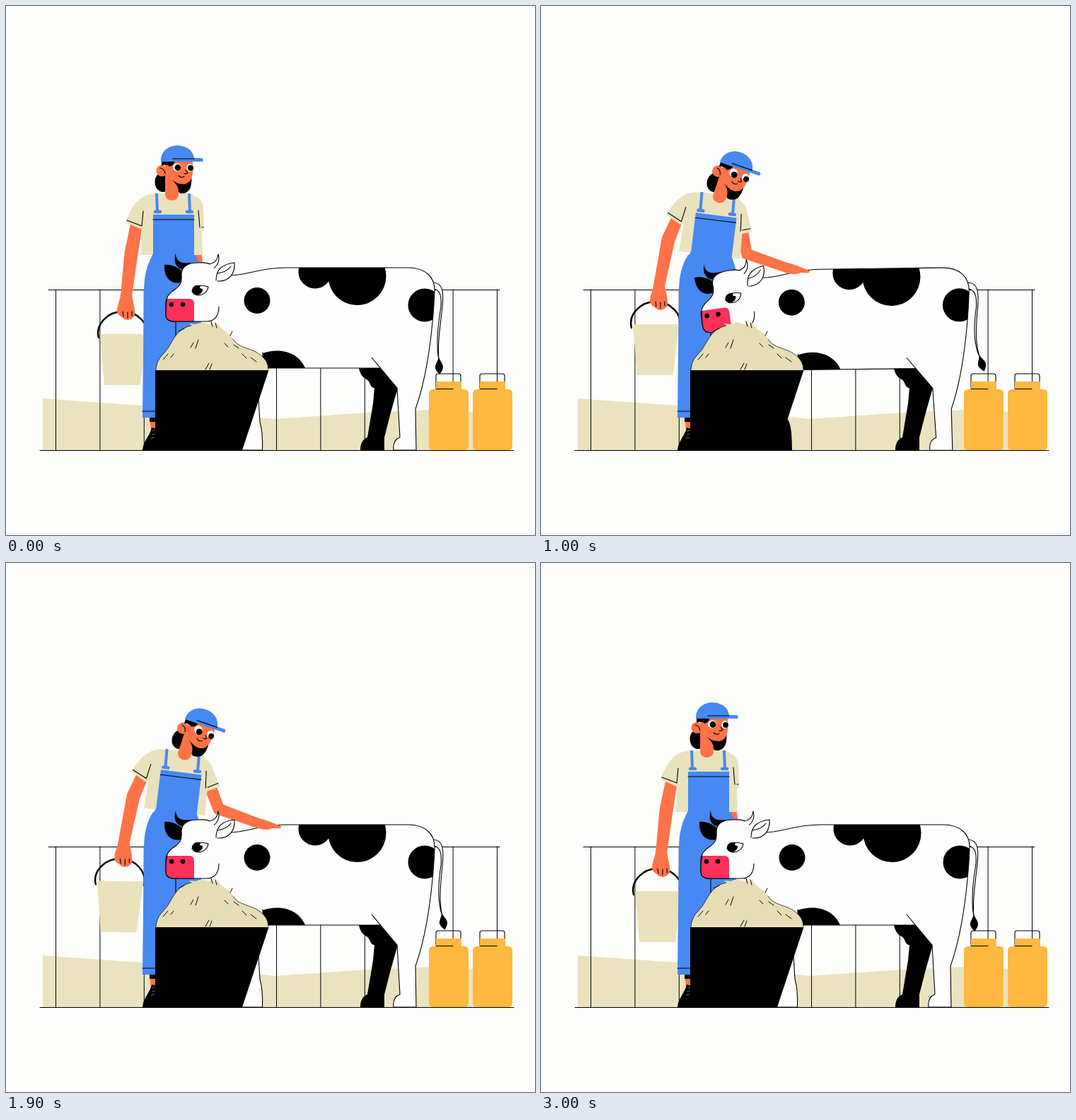
These frames come from a looping animation (748 px wide and 748 px high, 3030 ms). An HTML page:

```html
<!DOCTYPE html>
<html lang="en">
<head>
<meta charset="utf-8">
<title>Farmer and cow</title>
<style>
  html, body { margin: 0; width: 100%; height: 100%; overflow: hidden; background: #fdfdfb; }
  svg { display: block; width: 100%; height: 100%; }
  .ln { fill: none; stroke: #000; stroke-width: 1.1; stroke-linecap: round; stroke-linejoin: round; }
  .wh { fill: #fefefe; stroke: #000; stroke-width: 1.1; stroke-linejoin: round; stroke-linecap: round; }
  .skin { fill: #ff7348; }
  .blue { fill: #4788f2; }
  .shirt { fill: #e9e2bd; }
  .can { fill: #ffb840; }
</style>
</head>
<body>
<svg viewBox="0 0 748 748">
  <defs>
    <path id="bodyShape" d="M312 381C340 382 355 370 397 370H568C594 370 607 384 606 404C604 450 597 520 579 570L580 628H548C547 618 551 612 557 610L553 540L529 512H290V400Z"/>
    <clipPath id="bodyClip"><use href="#bodyShape"/></clipPath>
    <g id="can">
      <rect class="ln" x="608" y="520" width="35" height="22" rx="3"/>
      <path class="can" d="M608 531H644V542H648Q654 542 654 548V622Q654 628 648 628H604Q598 628 598 622V548Q598 542 604 542H608Z"/>
      <path class="ln" d="M608 541.5H632"/>
    </g>
    <path id="palm" class="skin" d="M-5-7C6-8 13-5 19-4L29-2C31 0 29 2 26 2L18 3C14 7 3 8-5 6Z"/>
  </defs>

  <path fill="#ebe3c0" d="M52 555L193 565L380 584L510 575L600 571L690 575V628H52Z"/>
  <path id="fence" class="ln" style="stroke-width:1"/>

  <g id="pail">
    <path class="shirt" d="M-32 31H33L25 103H-26Z"/>
    <path class="ln" style="stroke-width:2.4" d="M-34 36C-39 16-20-1 0-1S39 16 34 36"/>
  </g>

  <path id="farArm" class="skin"/>
  <use id="farHand" href="#palm"/>
  <g id="farSleeve">
    <path class="shirt" d="M-14-14C0-21 11-13 12 0L13 33H-12Z"/>
    <path class="ln" d="M-11 28H12"/>
  </g>

  <path id="nearArm" class="skin"/>
  <g id="nearHand">
    <path class="skin" d="M-8-2C-9 8-13 12-13 22C-11 29-6 29-4 32C0 35 5 34 8 32L12 28C13 18 9 8 8-2Z"/>
    <path class="ln" d="M-5 22L-4 29M2 23V31M8 22V28"/>
  </g>

  <g id="torso">
    <path class="shirt" d="M212 265H260C272 268 276 285 276 300L278 352H191L194 280Z"/>
    <g id="nearSleeve">
      <path class="shirt" d="M212 265C186 266 176 287 169 306L192 316L214 300Z"/>
      <path class="ln" d="M194 290L192 311L171 303"/>
    </g>
    <path class="ln" d="M272 289L274 313"/>
    <path class="blue" d="M208 295H266V352L272 368H200L208 350Z"/>
    <path class="ln" d="M208 302H266"/>
    <path d="M213 265L214 291M259 265L260 291" stroke="#4788f2" stroke-width="4"/>
    <path d="M211 291H218M256 291H263" stroke="#4788f2" stroke-width="4.5" stroke-linecap="round"/>
  </g>

  <path class="blue" d="M208 352C199 366 195 382 195 405L193 582H240V440H276C281 410 280 374 268 352Z"/>
  <path class="blue" d="M238 440H276V520H238Z"/>
  <path class="ln" d="M193 573H213M240 440V470"/>
  <path class="skin" d="M203 582H213V600H205Z"/>
  <path d="M203 582H213V588H203ZM193 628C194 615 204 607 206 596L213 598V628Z"/>
  <path d="M207 601L211 600M206 606L211 605M205 611L210 610" stroke="#5d6b60" stroke-width="1"/>

  <g id="face">
    <ellipse cx="222" cy="249" rx="11.500" ry="14"/>
    <path class="skin" d="M225 235H244V266C244 278 225 278 225 266Z"/>
    <path d="M234 246L262 240C264 258 258 266 246 265L244 263C244 256 240 250 234 246Z"/>
    <path class="skin" d="M225 218H264V236C263 247 257 252 251 252C243 252 238 248 234 246L225 246Z"/>
    <circle class="skin" cx="220.500" cy="233" r="8"/>
    <path class="ln" d="M218 229Q224 230 225 237"/>
    <path d="M220 219H239C237 225 233 227 231 227C228 224 224 224 220 226Z"/>
    <circle cx="242" cy="228" r="5.800" fill="#fff"/>
    <ellipse cx="260" cy="228.500" rx="4.600" ry="5.400" fill="#fff"/>
    <g id="pupils"><circle cx="243" cy="228.500" r="4.400"/><circle cx="261" cy="229" r="4"/></g>
    <path class="ln" d="M254 232L257 236Q255 238 252 237M244 240Q248 244 252 241"/>
    <path class="blue" d="M219 220C218 191 262 190 266 215H277Q280 217 278 220Z"/>
    <path class="ln" d="M236 216H266"/>
  </g>

  <g><path id="tailLine" class="wh"/><path id="tuft" d="M0-3C-2 3-6 8-5 12C-4 16-1 18 1 21C3 18 6 15 6 10C5 5 2 2 0-3Z"/></g>
  <path d="M499 512H530L554 540L544 575L535 610V628H501C501 618 505 612 511 610L519 562L521 540C514 540 516 530 508 527C503 524 500 518 499 512Z"/>
  <path d="M335 550L348 583C353 590 355 602 355 628H325Z"/>
  <path id="foreleg" class="wh" d="M325 540H350L357 556L359 588C363 602 363 615 362.500 628H325Z"/>

  <g id="cow">
    <use href="#bodyShape" fill="#fefefe"/>
    <g clip-path="url(#bodyClip)">
      <circle cx="355" cy="416.500" r="18.500"/>
      <circle cx="437" cy="376" r="23.500"/>
      <circle cx="496.500" cy="382" r="41"/>
      <circle cx="592" cy="423" r="23.500"/>
      <path d="M363 491C385 483 413 488 423 512H363Z"/>
    </g>
    <path class="ln" d="M312 381C340 382 355 370 397 370H568C594 370 607 384 606 404C604 450 597 520 579 570L580 628H548C547 618 551 612 557 610L553 540L517 497M363 490V512H529"/>
  </g>
  <use id="frontHand" href="#palm"/>

  <g id="cowHead">
    <path d="M240 350C240 361 248 365 262 363L251 373C240 371 236 361 240 350Z"/>
    <path d="M224 366C233 365 243 369 250 376L247 391C233 394 223 384 224 366Z"/>
    <path class="wh" d="M300 351C303 361 298 369 289 374L284 365C294 365 299 360 300 351Z"/>
    <path fill="#fefefe" d="M280 364L316 382L312 440H290Z"/>
    <path class="wh" d="M288 365C283 362 278 363 272 363C258 363 248 368 248 380C249 392 246 395 240 400C230 406 226 412 226 420V436C226 443 231 446 238 446H284C295 446 301 438 301 425"/>
    <path fill="#fefefe" d="M286 366L300 374L306 425L299 425L280 380Z"/>
    <path class="wh" d="M297 388C297 372 306 365 323 363C324 377 317 390 299 389"/>
    <path class="ln" d="M299 378C307 377 314 374 318 368"/>
    <path fill="#ff3059" d="M228 414H259Q266 414 266 421V445.500H238C230 445 226.500 442 226.500 436V420Z"/>
    <path class="ln" d="M228 414C226 418 226 430 226 436C226 443 231 446 238 446H266"/>
    <circle cx="234" cy="422" r="3.300"/><circle cx="250" cy="422" r="3.300"/>
    <path class="wh" d="M263 404C264 396 273 393 286 397C285 405 277 411 267 408"/>
    <path d="M263 403C263 396 270 393 275 396L274 399L278 400C279 409 264 412 263 403Z"/>
  </g>

  <path fill="#e7ddb5" d="M212 516C213 498 222 494 229 484C238 469 243 456 262 452L259 449L268 450L277 447L288 450L291 446L294 451L299 448C305 460 316 460 321 471C328 484 346 483 358 492C369 500 371 508 371 516Z"/>
  <path class="ln" style="stroke-width:.7" d="M212 514C213 498 222 494 229 484C238 469 243 456 262 452M321 471C328 484 346 483 358 492C369 500 371 508 371 514"/>
  <path class="ln" style="stroke-width:1" d="M244 460L252 456M290 446L292 453M296 448L298 455M272 472L268 484M265 476L261 483M229 492L222 500M237 492L233 497M287 505L282 514M291 506L288 514M309 477L314 482M322 479L329 484M334 492L340 498M346 497L354 503M320 460L317 466"/>
  <path d="M211 515H371.500L334 628H211Z"/>
  <use href="#can"/><use href="#can" x="62"/>
  <path class="ln" d="M48 628.500H718"/>
</svg>

<script>
const LOOP = 3030;
const HIP = [235, 383], LEAN = 7, NOD = 12;
const ARM = 62.3;

// Each row: time in ms, then value(s)
const tracks = {
  lean: [[0, 0], [430, 0], [1000, 1], [2060, 1], [2620, 0], [LOOP, 0]],
  swing: [[0, 0], [430, 0], [770, 6], [1080, -1], [1270, 1], [2060, 1], [2350, -4], [2640, 1.5], [2850, 0], [LOOP, 0]],
  head: [[0, 0], [330, -7], [530, -8.5], [770, -6.5], [1000, -8], [1270, -9], [1630, -1.8], [1850, 0], [LOOP, 0]],
  step: [[0, 0], [300, -32], [540, -32], [770, -14], [1000, -32], [1290, -32], [1630, -5], [1850, 0], [LOOP, 0]],
  tail: [[0, 0], [330, 2], [770, 9], [1270, 14.5], [1630, 11], [2170, 1.5], [2600, 0], [LOOP, 0]],
  reach: [[0, 276, 409], [430, 276, 409], [770, 298, 398], [1000, 350, 371], [1270, 373, 367],
    [1630, 341, 367], [2080, 369, 370], [2170, 367, 370], [2400, 308, 396], [2640, 276, 409], [LOOP, 276, 409]]
};

const $ = id => document.getElementById(id);
const set = (id, name, value) => $(id).setAttribute(name, value);
const move = (id, value) => set(id, 'transform', value);
const mix = (a, b, k) => a.map((v, i) => v + (b[i] - v) * k);
const sine = k => (1 - Math.cos(Math.PI * k)) / 2;
const cubic = k => k < .5 ? 4 * k ** 3 : 1 - (2 - 2 * k) ** 3 / 2;

function at(track, t, ease = sine) {
  const i = track.findIndex(row => row[0] > t);
  const a = track[i - 1], b = track[i];
  const row = mix(a, b, ease((t - a[0]) / (b[0] - a[0]))).slice(1);
  return row.length > 1 ? row : row[0];
}

function turn([x, y], deg, [cx, cy]) {
  const r = deg * Math.PI / 180, c = Math.cos(r), s = Math.sin(r);
  return [cx + (x - cx) * c - (y - cy) * s, cy + (x - cx) * s + (y - cy) * c];
}

// Tapered three-joint limb outline
function limb(pts, half) {
  const left = [], right = [];
  pts.forEach(([x, y], i) => {
    const a = pts[Math.max(0, i - 1)], b = pts[Math.min(2, i + 1)];
    const dx = b[0] - a[0], dy = b[1] - a[1], n = half[i] / Math.hypot(dx, dy);
    left.push([x - dy * n, y + dx * n]);
    right.unshift([x + dy * n, y - dx * n]);
  });
  return 'M' + left.concat(right).join('L') + 'Z';
}

function elbow(s, w) {
  const dx = w[0] - s[0], dy = w[1] - s[1], d = Math.hypot(dx, dy);
  const k = Math.sqrt(Math.max(0, ARM * ARM - d * d / 4)) / d;
  return [(s[0] + w[0]) / 2 - dy * k, (s[1] + w[1]) / 2 + dx * k];
}

function farmer(t) {
  const lean = at(tracks.lean, t, cubic), swing = at(tracks.swing, t), deg = LEAN * lean;
  const tilt = `rotate(${deg} ${HIP})`;
  move('torso', tilt);
  move('nearSleeve', `rotate(${5 * lean} 205 278)`);
  move('face', `translate(${3 * lean} ${2.5 * lean}) ${tilt} rotate(${NOD * lean} 235 270)`);
  move('pupils', `translate(${lean} ${1.6 * lean})`);

  const wrist = mix([170, 410], [167, 396], lean);
  wrist[0] -= swing / 2;
  set('nearArm', 'd', limb([turn([188, 290], deg, HIP), mix([177, 350], [180, 330], lean), wrist], [8, 9.5, 8]));
  move('nearHand', `translate(${wrist}) rotate(${swing / 2})`);
  move('pail', `translate(${wrist[0] - 5} ${wrist[1] + 23}) rotate(${swing})`);

  const s = turn([267, 285], deg, HIP), w = at(tracks.reach, t), e = elbow(s, w);
  set('farArm', 'd', limb([s, e, w], [9, 9, 7]));
  move('farSleeve', `translate(${s}) rotate(${Math.atan2(e[1] - s[1], e[0] - s[0]) * 180 / Math.PI - 90})`);
  move('farHand', `translate(${w}) rotate(10)`);
  move('frontHand', `translate(${w}) rotate(10)`);
  set('frontHand', 'visibility', w[0] > 325 ? 'visible' : 'hidden');
}

function cow(t) {
  const nod = at(tracks.head, t), d = at(tracks.tail, t);
  move('cow', `rotate(${nod * .085} 580 470)`);
  move('cowHead', `rotate(${nod} 349 425)`);
  move('foreleg', `translate(${at(tracks.step, t)})`);
  const x = 612 + d * .75, y = 500 - d * .3;
  set('tailLine', 'd', `M604 391C618 392 619 404 ${617 + d * .05} 425C${613 + d * .1} 460 ${610 + d * .4} 480 ${x} ${y}C${608 + d * .35} 480 ${610 + d * .1} 455 ${615 + d * .05} 425C616 410 614 402 605 400`);
  move('tuft', `translate(${x} ${y}) rotate(${-d * 1.2})`);
}

let fence = 'M60 401.500H698';
for (let i = 0; i < 11; i++) fence += `M${70.5 + i * 62.4} 401V628`;
set('fence', 'd', fence);

const start = performance.now();
function tick() {
  const t = (performance.now() - start) % LOOP;
  farmer(t);
  cow(t);
  requestAnimationFrame(tick);
}
tick();
</script>
</body>
</html>
```
